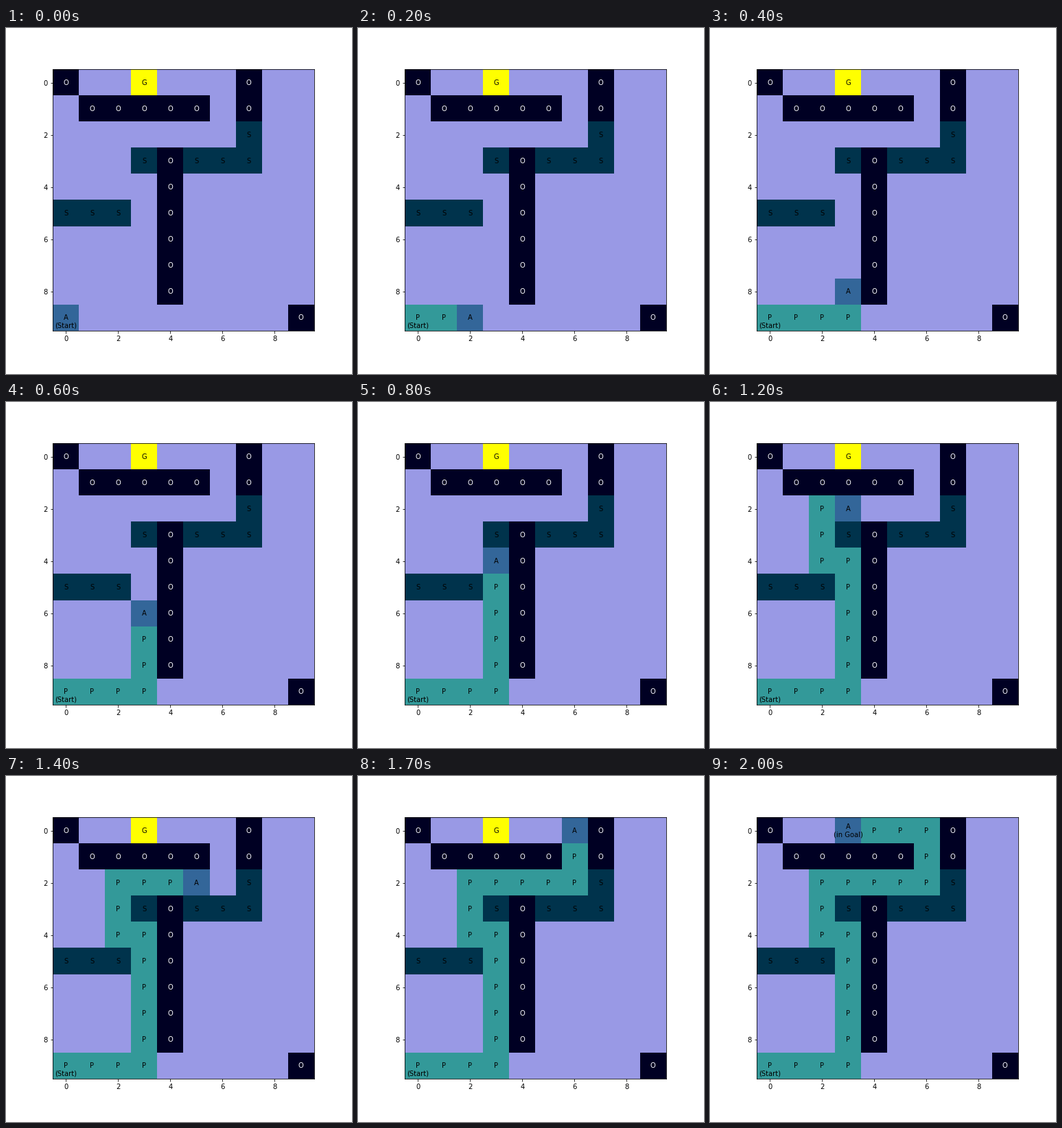
These frames come from a looping animation (504x504 px, 3000 ms). A matplotlib script:

```python
import matplotlib.pyplot as plt
import numpy as np
from matplotlib.animation import FuncAnimation

SIZE = 10
FREE = (0.6, 0.6, 0.9)
OBSTACLE = (0.0, 0.0, 0.14)
SLOW = (0.0, 0.2, 0.3)
AGENT = (0.2, 0.4, 0.6)
TRAIL = (0.2, 0.6, 0.6)
GOAL = (1.0, 1.0, 0.0)

# Cells are (row, column)
obstacles = ([(0, 0), (0, 7), (1, 7), (9, 9)]
             + [(1, c) for c in range(1, 6)]
             + [(r, 4) for r in range(3, 9)])
slow_cells = ([(2, 7), (3, 3)] + [(3, c) for c in range(5, 8)]
              + [(5, c) for c in range(3)])
goal = (0, 3)


def walk(corners):
    """List every cell on the straight legs between the corners."""
    cells = [corners[0]]
    for end in corners[1:]:
        while cells[-1] != end:
            r, c = cells[-1]
            cells.append((r + int(np.sign(end[0] - r)),
                          c + int(np.sign(end[1] - c))))
    return cells


path = walk([(9, 0), (9, 3), (4, 3), (4, 2), (2, 2), (2, 6), (0, 6), goal])
last = len(path) - 1

fig = plt.figure(figsize=(7, 7), dpi=72, facecolor="white")
fig.subplots_adjust(left=0.125, right=0.9, bottom=0.125, top=0.88)
ax = fig.add_subplot()

base = np.full((SIZE, SIZE, 3), FREE)
for cells, color in ((obstacles, OBSTACLE), (slow_cells, SLOW), ([goal], GOAL)):
    for cell in cells:
        base[cell] = color
image = ax.imshow(base, interpolation="nearest")


def label(cell, text, color="black"):
    return ax.text(cell[1], cell[0], text, color=color, size=10,
                   ha="center", va="center")


for cell in obstacles:
    label(cell, "O", "white")
for cell in slow_cells:
    label(cell, "S")
label(path[0], "\n\n(Start)")
goal_text = label(goal, "G")
trail_texts = [label(cell, "P") for cell in path[:-1]]
agent_text = label(path[0], "A")


def update(frame):
    step = min(frame, last)
    grid = base.copy()
    for cell in path[:step]:
        grid[cell] = TRAIL
    row, col = path[step]
    grid[row, col] = AGENT
    image.set_data(grid)
    for i, text in enumerate(trail_texts):
        text.set_visible(i < step)
    goal_text.set_visible(step < last)
    agent_text.set_position((col, row))
    agent_text.set_text("A\n(in Goal)" if step == last else "A")
    return [image, goal_text, agent_text, *trail_texts]


anim = FuncAnimation(fig, update, frames=30, interval=100,
                     init_func=lambda: update(0), repeat=True, repeat_delay=0)
plt.show()
```
